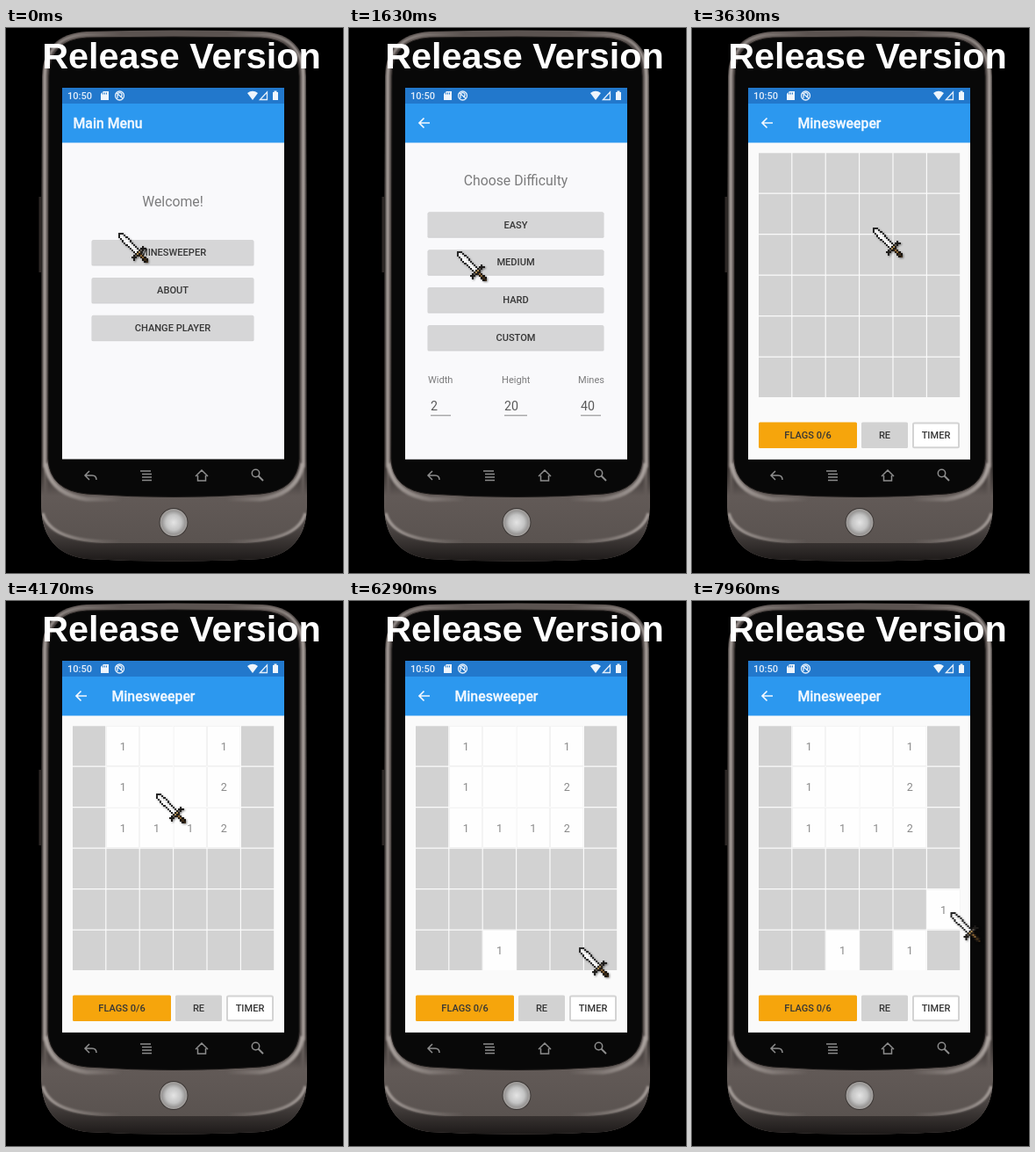
An HTML page that plays this animation: 384 by 620 pixels, repeating every 8 s.

```html
<!DOCTYPE html>
<html lang="en">
<head>
<meta charset="utf-8">
<title>Minesweeper demo</title>
<style>
html, body { margin: 0; width: 100%; height: 100%; overflow: hidden; background: #000; }
svg { display: block; width: 100vw; height: 100vh; }
text { font-family: Roboto, "Noto Sans", sans-serif; font-size: 11.07px; }
.headline { font: bold 41.4px "Liberation Sans", Arial, sans-serif; fill: #fff; }
.bar { font-size: 15.8px; font-weight: 500; fill: #f2f8fe; stroke: #f2f8fe; stroke-width: .3px; }
.lead { font-size: 15.8px; fill: #7c7c7d; text-anchor: middle; }
.label { fill: #7c7c7d; }
.value { font-size: 14.2px; fill: #5a5a5a; }
.button { font-weight: 500; fill: #363636; text-anchor: middle; }
.number { font-size: 12.6px; fill: #898989; text-anchor: middle; }
.soft { filter: blur(1.3px); }

.main-title, .game-title, .reveal, #back { animation: 8s step-end infinite; }
.main-title { animation-name: hide-main; }
.game-title { animation-name: show-title; }
#back { animation-name: show-back; }
#difficulty { animation: open-difficulty 8s linear infinite; }
#board { animation: open-board 8s linear infinite; }
.first { animation-name: reveal-first; }
.second { animation-name: reveal-second; }
.third { animation-name: reveal-third; }
.fourth { animation-name: reveal-fourth; }
#sword { animation: aim 8s ease-in-out infinite; filter: drop-shadow(1.5px 1.5px 1px #0007); }

@keyframes hide-main { 0% { opacity: 1 } 16.3%, 100% { opacity: 0 } }
@keyframes show-back { 0% { opacity: 0 } 16.3%, 100% { opacity: 1 } }
@keyframes show-title { 0% { opacity: 0 } 30.5%, 100% { opacity: 1 } }
@keyframes open-difficulty { 0%, 16.1% { opacity: 0 } 18%, 100% { opacity: 1 } }
@keyframes open-board { 0%, 38.8% { opacity: 0 } 40.1%, 100% { opacity: 1 } }
@keyframes reveal-first { 0% { opacity: 0 } 51.2%, 100% { opacity: 1 } }
@keyframes reveal-second { 0% { opacity: 0 } 70.4%, 100% { opacity: 1 } }
@keyframes reveal-third { 0% { opacity: 0 } 85%, 100% { opacity: 1 } }
@keyframes reveal-fourth { 0% { opacity: 0 } 94.8%, 100% { opacity: 1 } }
@keyframes aim {
  0%, .4% { transform: translate(128px, 233px) }
  3.1%, 23.4% { transform: translate(123px, 254px) }
  28.1%, 46% { transform: translate(206px, 227px) }
  50.3%, 57.7% { transform: translate(171px, 219px) }
  60.4% { transform: translate(156px, 371px) }
  63.5% { transform: translate(156px, 405px) }
  68%, 74.8% { transform: translate(161px, 401px) }
  78.6% { transform: translate(262px, 394px) }
  80.2% { transform: translate(266px, 395px) }
  82.9%, 88.8% { transform: translate(262px, 394px) }
  92.8%, 100% { transform: translate(294.5px, 354px) }
}
</style>
</head>
<body>
<svg viewBox="0 0 384 620">
  <defs>
    <linearGradient id="rim">
      <stop offset="0" stop-color="#1b1817"/>
      <stop offset=".015" stop-color="#766d69"/>
      <stop offset=".03" stop-color="#3a3433"/>
      <stop offset=".12" stop-color="#5b5350"/>
      <stop offset=".88" stop-color="#5b5350"/>
      <stop offset=".97" stop-color="#3a3433"/>
      <stop offset=".985" stop-color="#7d7470"/>
      <stop offset="1" stop-color="#1b1817"/>
    </linearGradient>
    <linearGradient id="chin" x2="0" y2="1">
      <stop offset="0" stop-color="#3c3634" stop-opacity="0"/>
      <stop offset=".35" stop-color="#625a57"/>
      <stop offset=".8" stop-color="#5a5350"/>
      <stop offset="1" stop-color="#47413f"/>
    </linearGradient>
    <linearGradient id="lip" x2="0" y2="1">
      <stop offset=".3" stop-color="#4b4543"/>
      <stop offset="1" stop-color="#191615"/>
    </linearGradient>
    <linearGradient id="shine">
      <stop offset="0" stop-color="#aaa29e"/>
      <stop offset=".3" stop-color="#aaa29e" stop-opacity="0"/>
      <stop offset=".7" stop-color="#aaa29e" stop-opacity="0"/>
      <stop offset="1" stop-color="#aaa29e"/>
    </linearGradient>
    <radialGradient id="ball">
      <stop offset="0" stop-color="#e4e4e4"/>
      <stop offset=".6" stop-color="#c4c4c4"/>
      <stop offset="1" stop-color="#8d8b8a"/>
    </radialGradient>
    <clipPath id="body">
      <path id="outline" d="M41 55Q42 7 92 4Q191 1 292 4Q341 7 342 55L343 190V545Q341 598 290 604Q191 609 92 604Q42 598 40 545V190Z"/>
    </clipPath>
  </defs>

  <rect width="384" height="620"/>

  <g id="phone">
    <rect x="37.500" y="192" width="3" height="86" fill="#2c2725"/>
    <use href="#outline" fill="url(#rim)"/>
    <g clip-path="url(#body)">
      <path fill="url(#chin)" d="M40 490H343V610H40Z"/>
      <path fill="url(#lip)" d="M40 552Q48 583 110 586H272Q335 583 343 552V610H40Z"/>
      <g class="soft" fill="none" stroke="url(#shine)">
        <path stroke-width="3" d="M44 500V55Q46 9 92 7.500Q191 5 292 7.500Q337 9 339 55V500"/>
        <path stroke-width="5" d="M45 495Q50 530 92 536H290Q333 530 338 495"/>
        <path stroke-width="3" d="M42 552Q50 582 110 584H272Q333 582 341 552"/>
      </g>
    </g>
    <path fill="#080808" stroke="#1d1a19" d="M49 55Q50 13 92 11Q191 9 290 11Q333 13 334 55V490Q332 526 290 530Q191 537 92 530Q50 526 48 490Z"/>
    <circle cx="191" cy="562.5" r="16.5" fill="#3b3634"/>
    <circle cx="191" cy="562.5" r="14.5" fill="url(#ball)" stroke="#a09d9b" stroke-width="2"/>
    <g fill="none" stroke="#8d8d8d" stroke-width="1.500">
      <path d="M95 504L90 509L95 514M90 509H98Q103 509 103 514"/>
      <path d="M153 504H165M155 507.500H166M155 511H166M155 514.500H166"/>
      <path d="M216 510L223 503L230 510M218.500 509V515H227.500V509"/>
      <circle cx="284.500" cy="506.500" r="4.200"/>
      <path d="M287.500 509.500L293 515" stroke-width="2"/>
    </g>
  </g>

  <g id="screen">
    <rect x="64" y="68" width="253" height="422.500" fill="#f9f9fb"/>
    <g id="menu"><text class="lead" x="190" y="203">Welcome!</text></g>
    <g id="difficulty">
      <rect x="64" y="130" width="253" height="360.500" fill="#f9f9fb"/>
      <text class="lead" x="190" y="179">Choose Difficulty</text>
    </g>
    <g id="board"><rect x="64" y="130" width="253" height="360.500" fill="#fafafa"/></g>

    <rect x="64" y="68" width="253" height="18" fill="#2278cc"/>
    <rect x="64" y="86" width="253" height="44.500" fill="#2c98ef"/>
    <text x="70" y="81" font-weight="500" fill="#e3eefa">10:50</text>
    <g fill="#eef5fc">
      <path d="M108 75L111 72H117V82H108Z"/>
      <path d="M275 74Q281 69.500 287 74L281 82Z"/>
      <path d="M304 73H305.500V71.500H308.500V73H310V82H304Z"/>
    </g>
    <path d="M110.500 73.500V75.500M112.500 73.500V75.500M114.500 73.500V75.500" stroke="#2278cc"/>
    <g fill="none" stroke="#e3eefa" stroke-width="1.300">
      <circle cx="129.500" cy="77" r="5"/>
      <path d="M127 80V76A2.500 2.500 0 1 1 130 78.500M126 74L133 80"/>
      <path d="M289.500 81.500L297.500 73V81.500Z"/>
    </g>
    <text class="bar main-title" x="76.500" y="114">Main Menu</text>
    <text class="bar game-title" x="120.500" y="114">Minesweeper</text>
    <path id="back" d="M92 108H80.500M85.500 102.500L80 108L85.500 113.500" fill="none" stroke="#f2f8fe" stroke-width="1.700"/>
  </g>

  <g id="sword" shape-rendering="crispEdges"></g>
  <text class="headline" x="41.200" y="45.500">Release Version</text>
</svg>
<script>
const byId = id => document.getElementById(id);

function add(parent, tag, attrs, content = '') {
  const node = document.createElementNS('http://www.w3.org/2000/svg', tag);
  for (const key in attrs) node.setAttribute(key, attrs[key]);
  node.textContent = content;
  return parent.appendChild(node);
}

function box(parent, x, y, width, height, fill, extra) {
  return add(parent, 'rect', { x, y, width, height, fill, ...extra });
}

function button(parent, x, y, width, height, label, fill = '#d6d6d7', extra) {
  if (!extra) box(parent, x - .5, y + .5, width + 1, height + .5, '#d0d0d1', { rx: 1.5 });
  box(parent, x, y, width, height, fill, { rx: 1.5, ...extra });
  add(parent, 'text', { class: 'button', x: x + width / 2, y: y + height / 2 + 4 }, label);
}

const [menu, difficulty, board, sword] = ['menu', 'difficulty', 'board', 'sword'].map(byId);

['MINESWEEPER', 'ABOUT', 'CHANGE PLAYER'].forEach((label, i) =>
  button(menu, 98, 241 + i * 42.9, 184, 28.5, label));

['EASY', 'MEDIUM', 'HARD', 'CUSTOM'].forEach((label, i) =>
  button(difficulty, 90, 209.3 + i * 42.9, 200, 28.5, label));

[['Width', 90, '2', 93, 23], ['Height', 174, '20', 177, 26], ['Mines', 261, '40', 264, 23]]
  .forEach(([label, labelX, value, x, width]) => {
    add(difficulty, 'text', { class: 'label', x: labelX, y: 404 }, label);
    add(difficulty, 'text', { class: 'value', x, y: 435 }, value);
    box(difficulty, x, 440.3, width, 1, '#858585');
  });

const cell = (parent, col, row, fill) =>
  box(parent, 76 + col * 38.4, 142.3 + row * 46.5, 37.2, 45.2, fill);

function reveal(name, col, row, count) {
  const group = add(board, 'g', { class: 'reveal ' + name });
  cell(group, col, row, '#fefefe');
  add(group, 'text', { class: 'number', x: 95 + col * 38.3, y: 169.8 + row * 46.5 }, count);
}

for (let row = 0; row < 6; row++)
  for (let col = 0; col < 6; col++) cell(board, col, row, '#d2d2d2');

['1  1', '1  2', '1112'].forEach((line, row) =>
  [...line].forEach((count, i) => reveal('first', i + 1, row, count.trim())));
reveal('second', 2, 5, '1');
reveal('third', 4, 5, '1');
reveal('fourth', 5, 4, '1');

button(board, 76, 448.5, 112, 29.6, 'FLAGS 0/6', '#f6a50c', { stroke: 'none' });
button(board, 193, 448.5, 53, 29.6, 'RE', '#d2d2d2', { stroke: 'none' });
button(board, 252, 449.5, 52, 27.8, 'TIMER', '#fff', { stroke: '#d3d3d3', 'stroke-width': 2 });

// Pixel sword: blade along the diagonal, guard across it, grip and pommel at the end.
function swordColor(x, y) {
  const across = Math.abs(x - y), along = x + y;
  if (across <= 1 && along >= 27) return across ? '#17130f' : '#3d2c18';
  if (across <= 1 && along > 22) return across ? '#2b2015' : '#8a6534';
  if (along >= 20 && along <= 22 && across <= 6)
    return along === 21 && across < 5 ? (across === 1 ? '#a8874f' : '#5a544e') : '#1e1c1a';
  if (along >= 20) return null;
  if (along < 2 || across === 2) return '#262626';
  if (across < 2) return x > y ? '#d9d9d9' : '#fafafa';
  return null;
}

const pixel = 2.1;
for (let y = 0; y < 16; y++)
  for (let x = 0; x < 16; x++) {
    const fill = swordColor(x, y);
    if (fill) box(sword, x * pixel, y * pixel, pixel, pixel, fill);
  }
</script>
</body>
</html>
```
